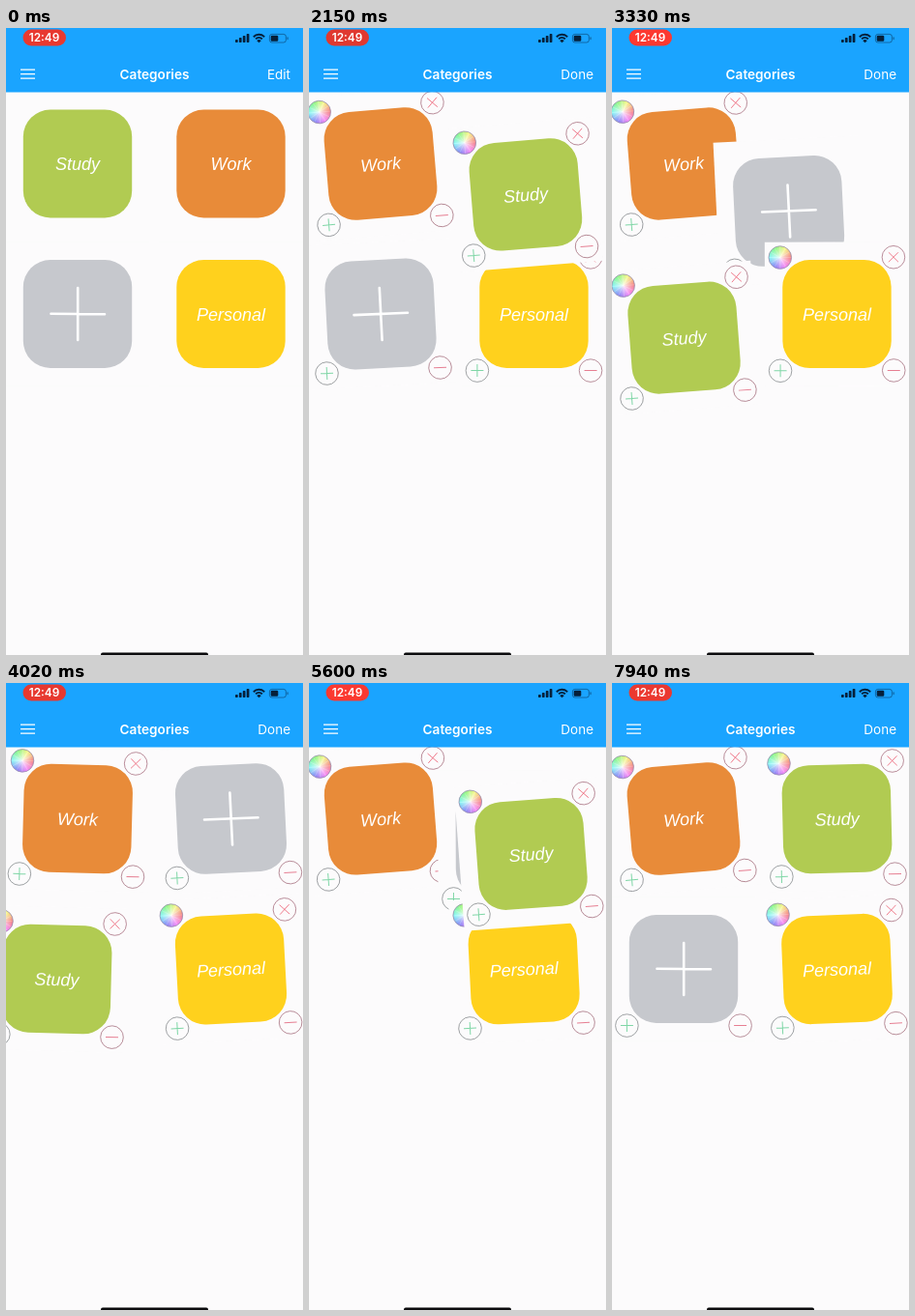
Animation of 307 by 649 pixels, one loop 8 s. Source, as an HTML page with a canvas:

```html
<!DOCTYPE html>
<html lang="en">
<head>
<meta charset="utf-8">
<title>Categories</title>
<style>
  html, body { margin: 0; width: 100%; height: 100%; overflow: hidden; background: #fcfbfc; }
  canvas { display: block; width: 307px; height: 649px; }
</style>
</head>
<body>
<canvas id="stage"></canvas>
<script>
const W = 307, H = 649, LOOP = 8000, EDIT_AT = 430;
const canvas = document.getElementById('stage');
const ctx = canvas.getContext('2d');
const dpr = window.devicePixelRatio || 1;
canvas.width = W * dpr;
canvas.height = H * dpr;

const PAPER = '#fcfbfc', TAU = Math.PI * 2;
const A = [74, 140.5], B = [232.5, 140.5], C = [74, 296], D = [232.5, 296];
const WIGGLE = 289.3; // ms per wobble
const SWAP = 305;     // ms a tile takes to change slots

// path: [time, x, y]; wobble: [from, middle, swing, phase] in degrees and radians.
// Listed from back to front. Study is dragged, the others make room for it.
const tiles = [
  { name: 'Work', color: '#e88b39',
    path: [[1680, ...B], [1680 + SWAP, ...A]],
    wobble: [[EDIT_AT, -1.6, 3.25, 0]] },
  { name: '', color: '#c6c8cd',
    path: [[3140, ...C], [3140 + SWAP, ...B], [5525, ...B], [5525 + SWAP, ...C]],
    wobble: [[EDIT_AT, -1.4, 1.5, 2.15], [2100, -1.45, 1.5, 0], [3400, -1.45, 1.45, Math.PI]] },
  { name: 'Personal', color: '#ffd11d',
    path: [[5507, ...D], [5660, 217, 296], [5525 + SWAP, ...D]],
    wobble: [[EDIT_AT, -1.55, 1.55, Math.PI], [5000, -2.4, 0.9, Math.PI / 2]] },
  { name: 'Study', color: '#b1cb52',
    path: [[1050, ...A], [1430, 98.5, 155], [1720, 178, 167], [2000, 222, 172], [2750, 227.5, 173.5],
           [2950, 218, 183], [3140, 148, 240], [3350, 72, 322], [3700, 55, 309], [4020, 52.5, 306.5],
           [4850, 54, 302], [5300, 62, 296], [5520, 168, 220], [5600, 229.5, 177],
           [5750, 235, 172], [5950, 235, 170], [6200, ...B]],
    wobble: [[EDIT_AT, -1.5, 3.15, 0], [6200, -1.35, 1.5, -Math.PI / 2]] }
];

// Smooth curve through the keys that never overshoots them.
function track(keys, t, axis) {
  const last = keys.length - 1;
  if (t <= keys[0][0]) return keys[0][axis];
  if (t >= keys[last][0]) return keys[last][axis];
  const slope = i => (keys[i + 1][axis] - keys[i][axis]) / (keys[i + 1][0] - keys[i][0]);
  const tangent = i => {
    if (i === 0 || i === last) return 0;
    const a = slope(i - 1), b = slope(i);
    return a * b > 0 ? 2 * a * b / (a + b) : 0;
  };
  let i = 0;
  while (t > keys[i + 1][0]) i++;
  const span = keys[i + 1][0] - keys[i][0], u = (t - keys[i][0]) / span, v = 1 - u;
  return keys[i][axis] * v * v * (1 + 2 * u) + keys[i + 1][axis] * u * u * (3 - 2 * u)
    + span * u * v * (tangent(i) * v - tangent(i + 1) * u);
}

function tilt(wobble, t) {
  const part = wobble.filter(w => w[0] <= t).pop();
  if (!part) return 0;
  const [, middle, swing, phase] = part;
  return (middle + swing * Math.cos(TAU * (t - 1430) / WIGGLE + phase)) * Math.PI / 180;
}

function box(x, y, w, h, r, color) {
  ctx.beginPath();
  ctx.roundRect(x, y, w, h, r);
  ctx.fillStyle = color;
  ctx.fill();
}

function line(color, width, ...segments) {
  ctx.beginPath();
  for (const [x1, y1, x2, y2] of segments) {
    ctx.moveTo(x1, y1);
    ctx.lineTo(x2, y2);
  }
  ctx.strokeStyle = color;
  ctx.lineWidth = width;
  ctx.stroke();
}

function text(s, x, y, font, align) {
  ctx.font = font;
  ctx.textAlign = align;
  ctx.fillStyle = '#fff';
  ctx.fillText(s, x, y);
}

function disc(x, y, fill, ring) {
  ctx.beginPath();
  ctx.arc(x, y, 11.8, 0, TAU);
  ctx.fillStyle = fill;
  ctx.fill();
  ctx.strokeStyle = ring;
  ctx.lineWidth = 0.8;
  ctx.stroke();
}

function wheel(x, y) {
  const hues = ctx.createConicGradient(0, x, y);
  for (let i = 0; i <= 12; i++) hues.addColorStop(i / 12, `hsl(${360 - i * 30}, 85%, 74%)`);
  disc(x, y, hues, '#9a8fb0');
  const glow = ctx.createRadialGradient(x, y, 0, x, y, 11);
  glow.addColorStop(0, 'rgba(255,255,255,.8)');
  glow.addColorStop(1, 'rgba(255,255,255,0)');
  ctx.fillStyle = glow;
  ctx.fill();
  const spokes = [];
  for (let i = 0; i < 12; i++) {
    const a = i * TAU / 12;
    spokes.push([x, y, x + 11 * Math.cos(a), y + 11 * Math.sin(a)]);
  }
  line('rgba(255,255,255,.45)', 0.5, ...spokes);
}

function badges(full) {
  const r = 58.6;
  if (full) {
    wheel(-r, -r);
    disc(r, -r, PAPER, '#ab7484');
    line('#ee7284', 0.9, [r - 5, -r - 5, r + 5, -r + 5], [r - 5, -r + 5, r + 5, -r - 5]);
  }
  disc(-r, r, PAPER, '#888c8f');
  line('#7fd6a6', 1, [-r - 6.5, r, -r + 6.5, r], [-r, r - 6.5, -r, r + 6.5]);
  disc(r, r, PAPER, '#a87482');
  line('#e67e92', 1, [r - 6.5, r, r + 6.5, r]);
}

function drawTile(tile, t) {
  ctx.save();
  ctx.translate(track(tile.path, t, 1), track(tile.path, t, 2));
  ctx.rotate(tilt(tile.wobble, t));
  box(-74.5, -74.5, 149, 149, 0, PAPER);
  box(-56.2, -56, 112.4, 112, 28, tile.color);
  if (tile.name) {
    text(tile.name, 0, 6.7, 'italic 18px "Liberation Sans", Arial, sans-serif', 'center');
  } else {
    ctx.lineCap = 'round';
    line('#fff', 2.6, [-27.5, -0.3, 28, 0.2], [0.2, -27, 0.2, 27]);
    ctx.lineCap = 'butt';
  }
  if (t >= EDIT_AT) badges(tile.name);
  ctx.restore();
}

function drawStatus(t) {
  const ink = '#06203a';
  const glow = Math.cos(TAU * (t - 1430) / 2000);
  box(17.5, 1.5, 44.5, 17, 8.5, `rgb(${236 + 18 * glow}, 57, 48)`);
  text('12:49', 39.5, 14.3, '600 11.8px Inter, sans-serif', 'center');

  for (let i = 0; i < 4; i++) box(237 + i * 3.9, 12 - i * 2, 2.7, 3 + i * 2, 0.7, ink);

  ctx.strokeStyle = ink;
  ctx.lineWidth = 1.9;
  for (const r of [4.6, 7.8]) {
    ctx.beginPath();
    ctx.arc(261.5, 14.6, r, -Math.PI * 0.76, -Math.PI * 0.24);
    ctx.stroke();
  }
  ctx.beginPath();
  ctx.moveTo(261.5, 15.2);
  ctx.arc(261.5, 15.2, 3, -Math.PI * 0.76, -Math.PI * 0.24);
  ctx.fillStyle = ink;
  ctx.fill();

  ctx.beginPath();
  ctx.roundRect(272.4, 6.4, 17, 8.6, 2.5);
  ctx.strokeStyle = 'rgba(6,32,58,.5)';
  ctx.lineWidth = 0.9;
  ctx.stroke();
  box(273.7, 7.7, 7.6, 6, 1.3, ink);
  box(290.5, 9.2, 1.2, 3, 0.6, 'rgba(6,32,58,.5)');
}

function drawHeader(t) {
  box(0, 0, W, 66.5, 0, '#1aa4ff');
  drawStatus(t);
  line('#fff', 1.4, [15, 43.1, 30, 43.1], [15, 47.6, 30, 47.6], [15, 52.1, 30, 52.1]);
  text('Categories', 153.5, 53, '600 13.6px Inter, sans-serif', 'center');
  text(t < EDIT_AT ? 'Edit' : 'Done', 294, 53, '400 13.5px Inter, sans-serif', 'right');
}

function draw(t) {
  ctx.setTransform(dpr, 0, 0, dpr, 0, 0);
  box(0, 0, W, H, 0, PAPER);
  for (const tile of tiles) drawTile(tile, t);
  drawHeader(t);
  box(98, 646.6, 111, 4, 2, '#0b0b0d');
}

const start = performance.now();
function frame() {
  draw((performance.now() - start) % LOOP);
  requestAnimationFrame(frame);
}
frame();
</script>
</body>
</html>
```
